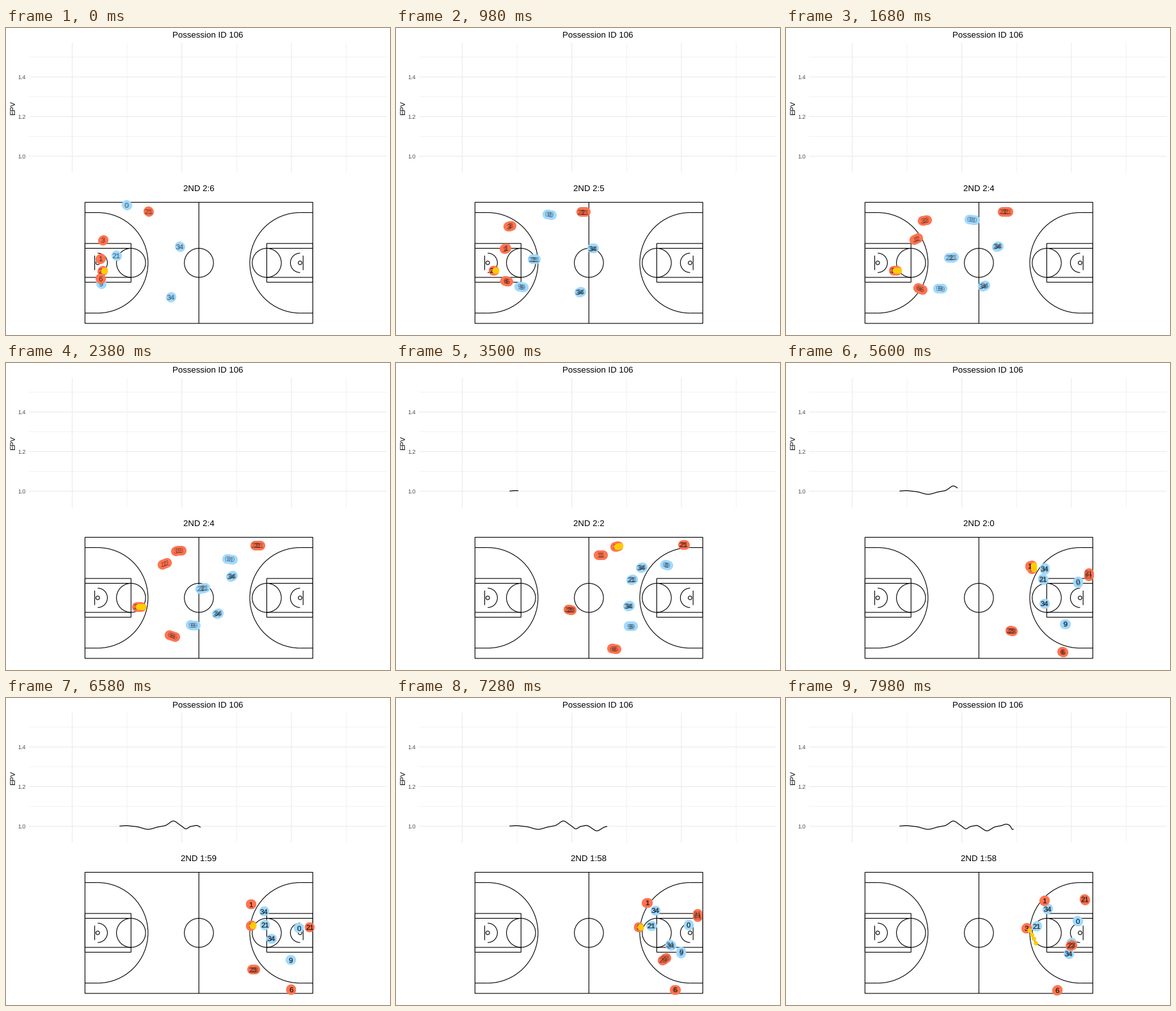
Write a matplotlib script that moves like this. It is 600 by 480 pixels and loops after 8000 ms.

```python
import numpy as np
import matplotlib.pyplot as plt
from matplotlib.animation import FuncAnimation
from matplotlib.collections import LineCollection
from matplotlib.patches import Arc, Circle, Rectangle

plt.rcParams["font.family"] = "Liberation Sans"
plt.rcParams["text.hinting"] = "none"

W, H, DPI = 600, 480, 100
PT = 72 / DPI                      # points per pixel
TICK, STEP, LOOP = 40, 140, 8000   # ms
RATE = 1.08                        # game seconds per second
ROW = 0.04 / RATE                  # seconds between tracking samples
TRAIL = 4
PASS_TIME = .54

BLUE, RED, GOLD = "#a1daff", "#ff7552", "#ffcc00"

# Where each player stands at the key times; the moves between are eased.
KEYS = [0, .98, 3.5, 4.62, 6.58, 7.98]
AWAY = [
    ("0", [(189, 277), (240, 292), (423, 316), (453, 322), (458, 360), (456, 349)]),
    ("21", [(173, 356), (216, 362), (369, 339), (395, 323), (405, 355), (392, 357)]),
    ("9", [(149, 400), (196, 405), (367, 412), (419, 407), (445, 410), (446, 383)]),
    ("34", [(272, 342), (308, 345), (384, 320), (406, 310), (403, 334), (409, 330)]),
    ("34", [(258, 421), (288, 413), (364, 380), (393, 378), (415, 376), (442, 400)]),
]
HOME = [
    ("21", [(223, 287), (293, 288), (450, 284), (470, 295), (475, 359), (467, 315)]),
    ("3", [(152, 332), (178, 310), (345, 287), (385, 286), (383, 356), (376, 360)]),
    ("1", [(148, 361), (171, 345), (320, 300), (379, 309), (383, 323), (404, 317)]),
    ("23", [(151, 380), (153, 379), (272, 386), (318, 407), (387, 425), (446, 387)]),
    ("6", [(148, 392), (173, 396), (341, 447), (404, 448), (446, 456), (424, 457)]),
]
FIRST_HOLDER = "23"
PASSES = [(2.62, "3"), (7.905, "6")]   # start time, receiver

# Bumps of the value curve: centre, height in pixels, width.
BUMPS = [(187, -1, 8), (222, 4.8, 13), (261.5, -8.2, 9), (281, 4.2, 5),
         (298, -1.5, 5), (314, 7.2, 9), (344, -3.2, 7), (354, 5.5, 3)]


def epv(x):
    return 200.5 + sum(h * np.exp(-((x - c) / w) ** 2) for c, h, w in BUMPS)


def spline(times, points):
    """Cubic Hermite path with harmonic-mean slopes, so it never overshoots."""
    t, p = np.array(times), np.array(points) - .5
    d = np.diff(p, axis=0) / np.diff(t)[:, None]
    a, b = d[:-1], d[1:]
    turn = a * b <= 0
    inner = np.where(turn, 0, 2 * a * b / np.where(turn, 1, a + b))
    m = np.vstack([d[:1] * .7, inner, d[-1:] * .5])

    def at(x):
        i = np.clip(np.searchsorted(t, x, "right") - 1, 0, len(t) - 2)
        h = t[i + 1] - t[i]
        u = (x - t[i]) / h
        return ((1 + 2 * u) * (1 - u) ** 2 * p[i] + u * (1 - u) ** 2 * h * m[i]
                + u * u * (3 - 2 * u) * p[i + 1] + u * u * (u - 1) * h * m[i + 1])
    return at


fig = plt.figure(figsize=(W / DPI, H / DPI), dpi=DPI, facecolor="white")
ax = fig.add_axes([0, 0, 1, 1])
ax.set(xlim=(0, W), ylim=(H, 0))
ax.axis("off")


def label(x, y, text, size, **kw):
    """Text whose capitals are centred on y."""
    return ax.text(x, y + .36 * size, text, fontsize=size * PT, va="baseline",
                   **{"ha": "center", **kw})


def lines(segments, color, width, z):
    ax.add_collection(LineCollection(segments, colors=color, linewidths=width * PT,
                                     zorder=z, snap=False))


def draw_chart():
    for i in range(6):
        x, y = 103.5 + 85.6 * i, 200.5 - 31 * i
        hline, vline = [(36, y), (595, y)], [(x, 23), (x, 226)]
        major = i % 2 == 0
        lines([hline, vline], "#ebebeb", 1.1 if major else .6, 0)
        if major:
            label(31, y, f"{1 + .1 * i:.1f}", 9, ha="right", color="#4d4d4d")
    label(315, 10.5, "Possession ID 106", 13.2)
    ax.text(13.8, 125, "EPV", fontsize=11 * PT, rotation=90, ha="center",
            va="baseline", rotation_mode="anchor")


def draw_court():
    """A 94 by 50 ft floor, drawn in feet from the top left corner."""
    left, top, ft = 123.4, 272.5, 356 / 94
    pen = dict(ec="black", lw=1.1 * PT, zorder=1, snap=False)

    def at(x, y):
        return left + x * ft, top + y * ft

    def box(x, y, w, h):
        ax.add_patch(Rectangle(at(x, y), w * ft, h * ft, fill=False, **pen))

    def ring(x, r):
        ax.add_patch(Circle(at(x, 25), r * ft, fill=False, **pen))

    box(0, 0, 94, 50)
    ring(47, 6)
    segs = [[at(47, 0), at(47, 50)]]
    for base, d in ((0, 1), (94, -1)):
        hoop, foul, board = base + 5.25 * d, base + 19 * d, base + 4 * d
        box(min(base, foul), 17, 19, 16)
        ring(foul, 6)
        ring(hoop, .75)
        for r in (4, 20.75):
            ax.add_patch(Arc(at(hoop, 25), 2 * r * ft, 2 * r * ft, angle=90 - 90 * d,
                             theta1=-90, theta2=90, **pen))
        segs += [[at(base, y), at(foul, y)] for y in (19, 31)]
        segs += [[at(base, y), at(hoop, y)] for y in (4.25, 45.75)]
        segs.append([at(board, 22), at(board, 28)])
    lines(segs, "black", 1.1, 1)


def dots(color, radius, z):
    return ax.scatter([], [], s=(2 * radius * PT) ** 2, c=color, linewidths=0, zorder=z)


class Team:
    def __init__(self, roster, color, z):
        self.paths = [spline(KEYS, pts) for _, pts in roster]
        self.dots = dots(color, 7.6, z)
        self.tags = [[ax.text(0, 0, name, fontsize=11.5 * PT, ha="center", va="baseline",
                              alpha=.38, zorder=z + 1) for _ in range(TRAIL)]
                     for name, _ in roster]

    def update(self, times):
        spots = []
        for path, tags in zip(self.paths, self.tags):
            trail = [path(t) for t in times]
            spots += trail
            for tag in tags:
                tag.set_visible(False)
            for tag, (x, y) in zip(tags, trail):
                tag.set_visible(True)
                tag.set_position((x, y + 4.1))
        self.dots.set_offsets(spots)


draw_chart()
draw_court()
clock = label(301, 250.5, "", 13.2)
curve, = ax.plot([], [], color="black", lw=1.2 * PT, zorder=2)
teams = [Team(AWAY, BLUE, 3), Team(HOME, RED, 5)]
holders = dict(zip([name for name, _ in HOME], teams[1].paths))
ball = dots(GOLD, 4.8, 7)


def ball_at(t):
    """The ball stays with its holder and flies straight during a pass."""
    spot = holders[FIRST_HOLDER](t)
    for start, receiver in PASSES:
        u = np.clip((t - start) / PASS_TIME, 0, 1)
        spot = spot + u * (holders[receiver](t) - spot)
    return spot + (3, 0)


def update(n):
    t = int((n + .5) * TICK // STEP) * STEP / 1000
    count = TRAIL if t > 0 else 2
    times = t + (np.arange(count) - (count - 1) / 2) * ROW

    for team in teams:
        team.update(times)
    ball.set_offsets([ball_at(x) for x in times])
    flying = any(0 < t - start < PASS_TIME for start, _ in PASSES)
    ball.set_sizes([(2 * (3.4 if flying else 4.8) * PT) ** 2])

    left = int(126.68 - RATE * t)
    clock.set_text(f"2ND {left // 60}:{left % 60}")

    x = np.arange(178, 178 + 36.8 * (t - 3.16), .5)
    curve.set_data(x, epv(x))
    return []


anim = FuncAnimation(fig, update, frames=LOOP // TICK, interval=TICK,
                     init_func=lambda: update(0), repeat=True, repeat_delay=0, blit=False)
plt.show()
```
